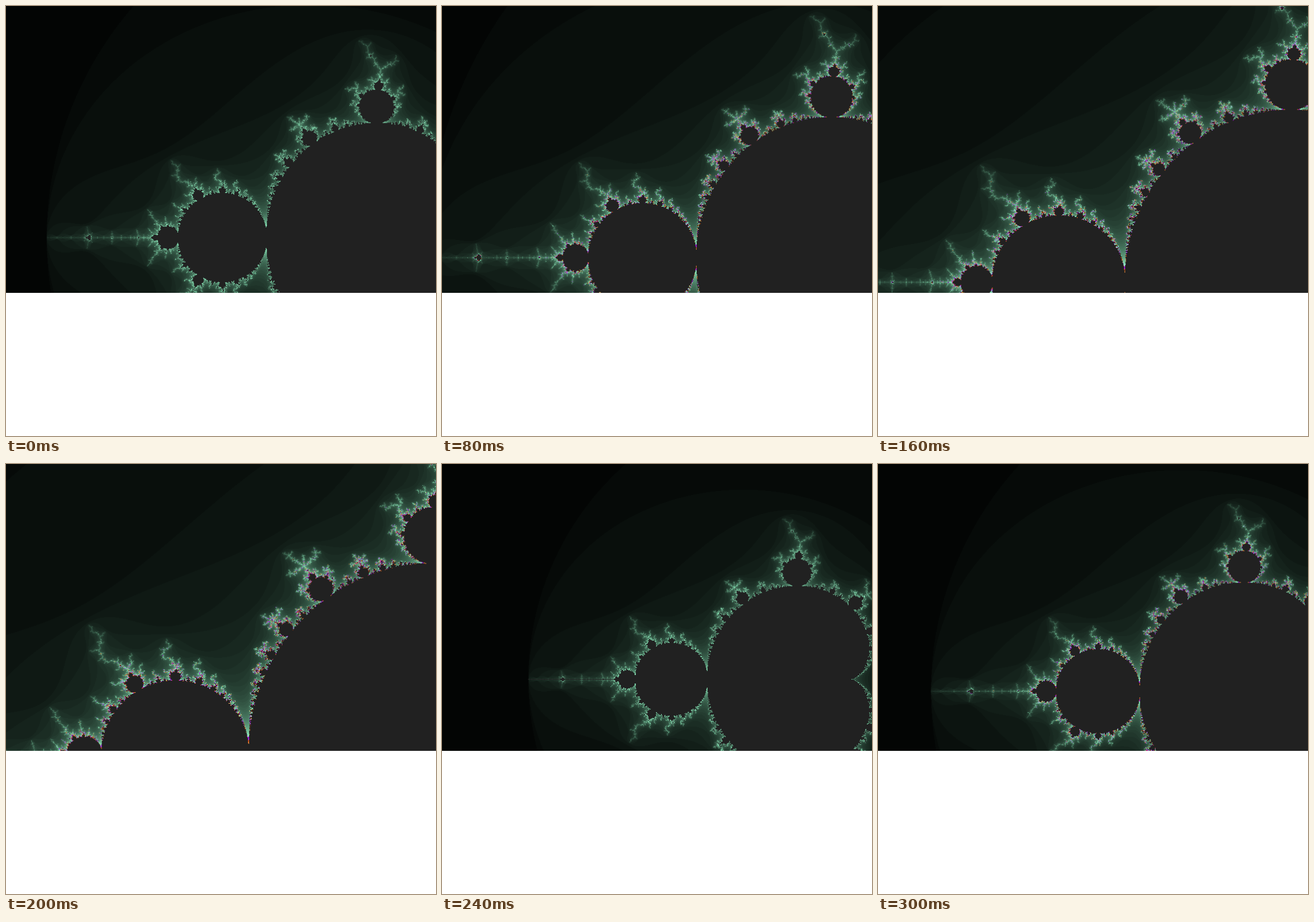
An HTML page with a canvas for the animation above (320 ms loop, 748 by 748 pixels).

```html
<!DOCTYPE html>
<html lang="en">
<head>
<meta charset="utf-8">
<title>Fractal zoom</title>
<style>
  html, body { margin: 0; width: 100%; height: 100%; overflow: hidden; background: #fff; }
  canvas { display: block; }
</style>
</head>
<body>
<canvas id="view" width="748" height="748"></canvas>
<script>
  const W = 750, H = 500;      // rendered size, fitted to the stage width
  const STAGE = 748;
  const STEPS = 16, STEP_MS = 20, FIRST = 4;
  const BASE = W / 3;          // pixels per unit at the widest view
  const SHRINK = 0.95;         // view size ratio per step
  const FOCUS = { re: -0.6, im: 0.5, x: W * 2 / 3, y: H / 2 };
  const LIMIT = 85;
  const MUTED = [0, 4];        // zoom levels without the wrapped colours
  const INSIDE = rgb(33, 33, 33);

  const ctx = document.getElementById('view').getContext('2d');
  const cache = [];
  let shown = -1;

  function rgb(r, g, b) {
    return (255 << 24 | (b & 255) << 16 | (g & 255) << 8 | r & 255) >>> 0;
  }

  // Number of iterations until |z| > 2, or LIMIT
  function escapeCount(re, im) {
    const im2 = im * im, a = re - 0.25, q = a * a + im2;
    if (q * (q + a) < im2 / 4) return LIMIT;
    if ((re + 1) * (re + 1) + im2 < 1 / 16) return LIMIT;
    let x = 0, y = 0, xx = 0, yy = 0, n = 0;
    while (n < LIMIT && xx + yy <= 4) {
      y = 2 * x * y + im;
      x = xx - yy + re;
      xx = x * x;
      yy = y * y;
      n++;
    }
    return n;
  }

  function palette(level) {
    const top = MUTED.includes(level) ? 52 : LIMIT;
    return Uint32Array.from({ length: LIMIT + 1 }, (_, n) =>
      n < top ? rgb(3 * n, 5 * n, 4 * n) : INSIDE);
  }

  function render(level) {
    const canvas = document.createElement('canvas');
    canvas.width = W;
    canvas.height = H;
    const out = canvas.getContext('2d');
    const image = out.createImageData(W, H);
    const pixels = new Uint32Array(image.data.buffer);
    const colors = palette(level);
    const scale = BASE / SHRINK ** level;
    for (let y = 0, i = 0; y < H; y++) {
      const im = FOCUS.im - (y - FOCUS.y) / scale;
      for (let x = 0; x < W; x++) {
        pixels[i++] = colors[escapeCount(FOCUS.re + (x - FOCUS.x) / scale, im)];
      }
    }
    out.putImageData(image, 0, 0);
    return canvas;
  }

  function draw() {
    const level = (Math.floor(performance.now() / STEP_MS) + FIRST) % STEPS;
    if (level !== shown) {
      cache[level] = cache[level] || render(level);
      ctx.fillStyle = '#fff';
      ctx.fillRect(0, 0, STAGE, STAGE);
      ctx.drawImage(cache[level], 0, 0, STAGE, STAGE * H / W);
      shown = level;
    }
    requestAnimationFrame(draw);
  }
  draw();
</script>
</body>
</html>
```
